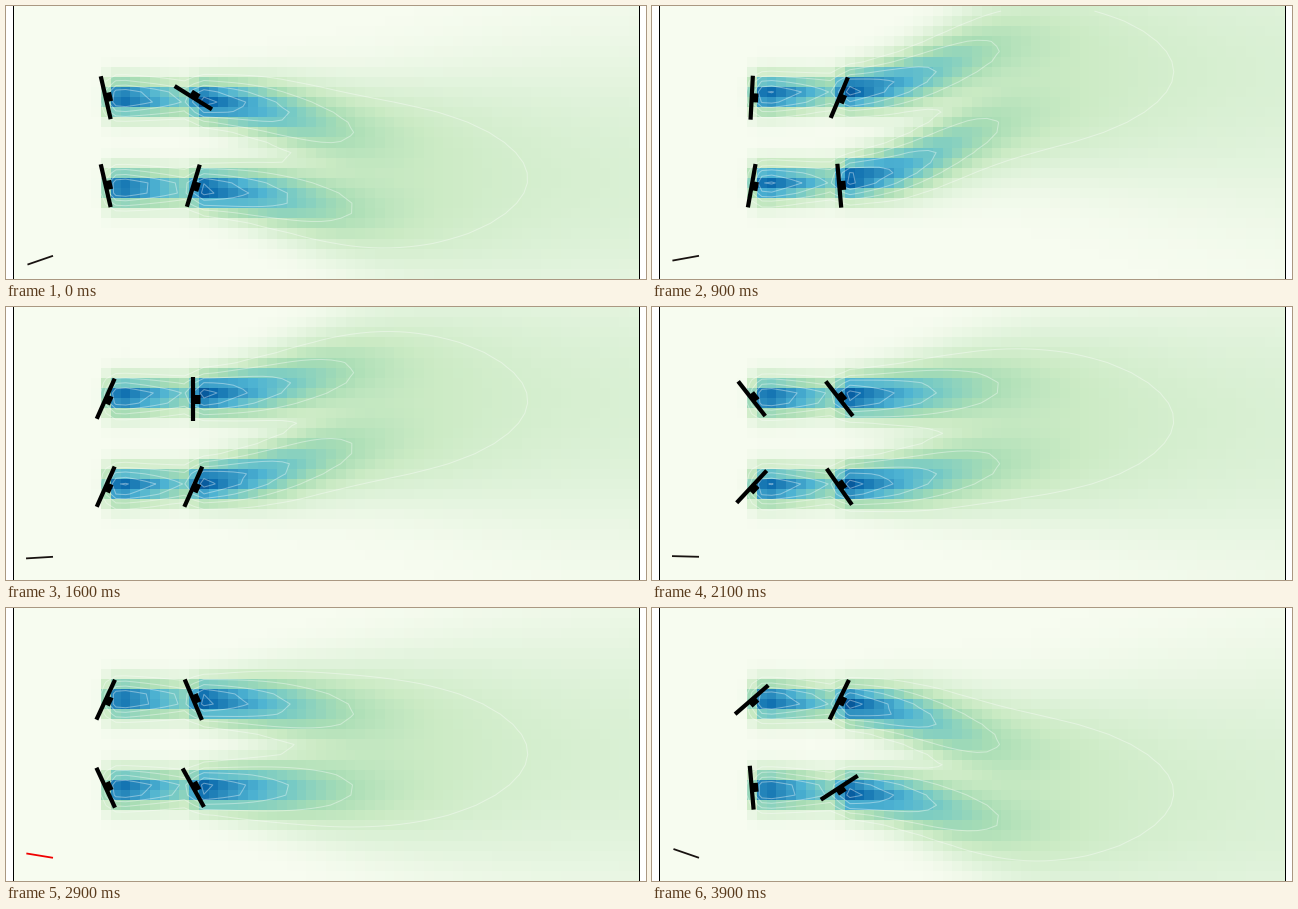
Write a matplotlib script that moves like this. It is 640 by 273 pixels and loops after 4000 ms.

```python
import numpy as np
import matplotlib.pyplot as plt
from matplotlib.animation import FuncAnimation

W, H = 640, 273
FRAMES, STEP = 40, 100
LEFT, RIGHT = 7.2, 633.2
COLS, ROWS = 64, 27
LEVELS = 0.2 + 0.16 * np.arange(5)

# Rotor centre and key tilts from vertical, in degrees
KEYS = [0, 9, 16, 21, 29, 33, 39]
TURBINES = [
    ((99.7, 91.7), [-13, 3, 24, -38, 25, -7, 49]),
    ((187.3, 91.7), [-58, 23, 0, -38, -23, 56, 26]),
    ((99.7, 179.7), [-13, 10, 24, 43, -25, -10, -5]),
    ((187.3, 179.7), [17, -5, 24, -35, -29, -3, 57]),
]

cw, ch = (RIGHT - LEFT) / COLS, H / ROWS
xs = LEFT + cw * (np.arange(COLS) + 0.5)
ys = ch * (np.arange(ROWS) + 0.5)


def rise(x0):
    return np.clip((xs - x0) / 22, 0, 1)


# Speed deficit behind the front and rear rotors, and wake width
front = rise(90) * (0.95 - 0.006 * (xs - 105)).clip(0)
rear = rise(172) * (0.1 + 0.85 * np.exp(-(xs - 193) / 130))
strength = np.maximum(front, rear)
spread = np.hypot(13.3, 0.17 * (xs - 160).clip(0))
bend = 1.06 + np.tanh((xs - 300) / 80)


def wake(y0, drift):
    mid = y0 + drift * bend
    return strength * np.exp(-((ys[:, None] - mid) / spread) ** 2 / 2)


def deficit(i):
    # Wakes swing up quickly, then drift back down
    swing = np.interp(i, [0, 9, 39], [18, -34, 24])
    return np.hypot(wake(90.5, swing + 4), wake(180.5, swing - 4))


fig = plt.figure(figsize=(W / 100, H / 100), dpi=100, facecolor="white")
ax = fig.add_axes([0, 0, 1, 1])
ax.axis("off")

flow = ax.imshow(deficit(0), cmap="GnBu", vmin=0, vmax=1, aspect="auto",
                 interpolation="nearest", extent=(LEFT, RIGHT, H, 0))
for x in (LEFT, RIGHT):
    ax.plot([x, x], [0, H], color="black", lw=0.72, zorder=3)


def bar(width):
    return ax.plot([], [], color="black", lw=width * 0.72,
                   solid_capstyle="butt", zorder=4)[0]


rotors = [bar(4.2) for _ in TURBINES]
hubs = [bar(9) for _ in TURBINES]
vane = bar(1.8)
ax.set_xlim(0, W)
ax.set_ylim(H, 0)
lines = []


def draw(i):
    field = deficit(i)
    flow.set_data(field)

    while lines:
        lines.pop().remove()
    lines.append(ax.contour(xs, ys, field, levels=LEVELS, colors="white",
                            alpha=0.38, linewidths=0.75, zorder=2))

    for ((x, y), tilts), rotor, hub in zip(TURBINES, rotors, hubs):
        a = np.radians(np.interp(i, KEYS, tilts))
        c, s = np.cos(a), np.sin(a)
        rotor.set_data([x - 22 * s, x + 22 * s], [y + 22 * c, y - 22 * c])
        hub.set_data([x, x + 6.5 * c], [y, y + 6.5 * s])

    turn = np.radians(19 - 38 * i / (FRAMES - 1))
    vane.set_data([47 - 27 * np.cos(turn), 47],
                  [249.8 + 27 * np.sin(turn), 249.8])
    vane.set_color("#f00000" if 25 <= i <= 30 else "#181210")
    return [flow, vane, *rotors, *hubs]


anim = FuncAnimation(fig, draw, frames=FRAMES, interval=STEP, repeat=True,
                     repeat_delay=0, blit=False)
plt.show()
```
